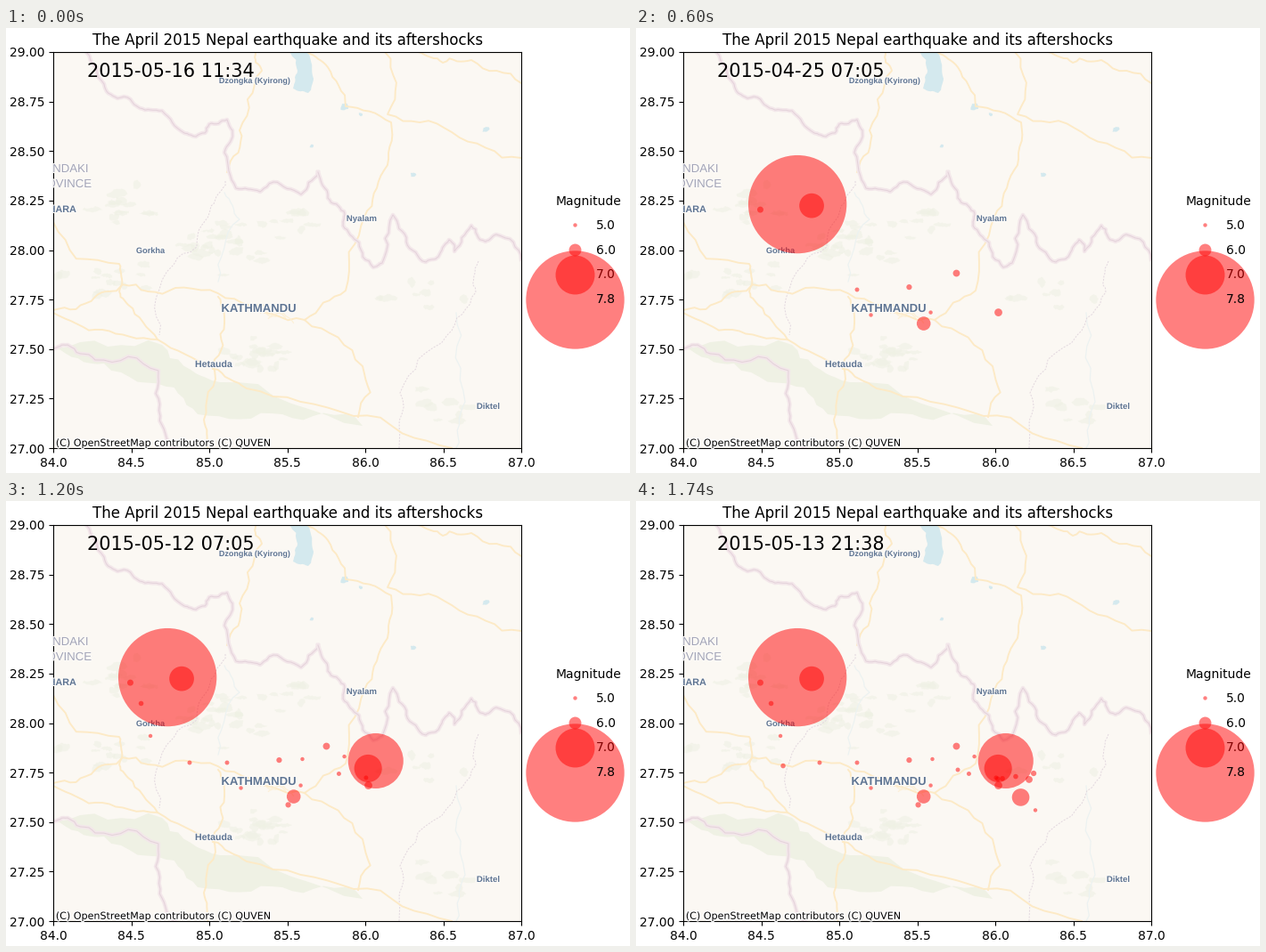
Recreate the animation shown at these times as a matplotlib script. Size 700 by 500 pixels, loop 1.8 s.

```python
import matplotlib.pyplot as plt
import numpy as np
from matplotlib import patheffects
from matplotlib.animation import FuncAnimation
from matplotlib.patches import Polygon
from matplotlib.transforms import Affine2D

W, H, DPI = 700, 500, 100
rng = np.random.default_rng(7)

# longitude, latitude, magnitude, in order of time
QUAKES = np.array([
    (84.731, 28.231, 7.8), (85.54, 27.629, 6.1), (86.019, 27.685, 5.6),
    (85.447, 27.813, 5.3), (85.113, 27.8, 5.1), (84.493, 28.204, 5.4),
    (85.585, 27.685, 5), (84.822, 28.224, 6.6), (85.75, 27.883, 5.5),
    (85.202, 27.672, 5), (85.596, 27.818, 5), (85.83, 27.744, 5.1),
    (86.004, 27.724, 5.1), (85.505, 27.587, 5.3), (84.562, 28.099, 5.2),
    (84.622, 27.935, 5), (84.873, 27.8, 5.1), (86.017, 27.771, 6.7),
    (85.865, 27.831, 5), (86.066, 27.809, 7.3), (86.015, 27.718, 5.2),
    (86.216, 27.715, 5.5), (86.162, 27.625, 6.3), (86.256, 27.56, 5),
    (86.245, 27.746, 5.3), (86.13, 27.73, 5.2), (85.759, 27.764, 5.1),
    (84.639, 27.784, 5.2), (86.045, 27.72, 5.2),
])
DAYS = {
    "04-25": "06:11 06:15 06:18 06:20 06:22 06:23 06:25 06:45 06:56 "
             "07:05 07:15 07:37 07:47 08:55 12:44 17:42 23:16",
    "04-26": "07:09 16:26",
    "05-12": "07:05 07:17 07:34 07:36 07:48 08:06 08:13 08:21 21:10",
    "05-13": "21:38",
}
# the clock opens on the last entry, before any quake is drawn
CLOCK = ["2015-05-16 11:34"] + [f"2015-{day} {t}" for day, times in DAYS.items()
                                for t in times.split()]
FRAMES = len(CLOCK)

fig = plt.figure(figsize=(W / DPI, H / DPI), dpi=DPI)
ax = fig.add_axes([53.2 / W, 28 / H, 525 / W, 445 / H], facecolor="#fbf8f3")
ax.set(xlim=(84, 87), ylim=(27, 29))
ax.set_title("The April 2015 Nepal earthquake and its aftershocks")
# stage pixels, y downwards
px = Affine2D().scale(1 / DPI, -1 / DPI).translate(0, H / DPI) + fig.dpi_scale_trans


def rough(pts, amount, levels=3):
    """Midpoint displacement, for a natural course."""
    pts = np.array(pts, float)
    for _ in range(levels):
        step = np.diff(pts, axis=0)
        normal = step[:, ::-1] * [-1, 1]
        mid = pts[:-1] + step / 2 + normal * rng.normal(0, amount, (len(step), 1))
        out = np.empty((2 * len(pts) - 1, 2))
        out[::2], out[1::2] = pts, mid
        pts = out
    return pts


def line(*pts, color="#fdeac6", width=1.9, core=None, amount=0.09, **kw):
    xy = rough(pts, amount)
    for c, w in ((color, width), (core, 1)):
        if c:
            ax.plot(*xy.T, color=c, lw=w * 0.72, transform=px, scalex=False,
                    scaley=False, solid_joinstyle="round", **kw)


def area(pts, color, amount=0.1, **kw):
    patch = Polygon(rough([*pts, pts[0]], amount), fc=color, lw=0, transform=px, **kw)
    ax.add_artist(patch)
    patch.set_clip_path(ax.patch)


def blob(x, y, rx, ry, color, **kw):
    a = np.linspace(0, 2 * np.pi, 9)[:-1]
    r = rng.uniform(0.6, 1.1, 8)
    area(np.column_stack([x + rx * r * np.cos(a), y + ry * r * np.sin(a)]), color, **kw)


def label(x, y, text, size, ha="center", color="#5f7593", weight="bold"):
    ax.text(x, y, text, fontsize=size * 0.72, ha=ha, va="baseline", color=color,
            weight=weight, family="Liberation Sans", transform=px, clip_on=True,
            path_effects=[patheffects.withStroke(linewidth=1.5, foreground="#fdfbf8")])


# woodland
GREEN = "#eff1e4"
area([(53, 360), (175, 356), (226, 400), (190, 404), (110, 377)], GREEN)
area([(172, 386), (240, 398), (400, 447), (310, 434), (215, 434)], GREEN)
for cx, cy, n in [(130, 200, 14), (110, 290, 14), (240, 245, 24), (330, 225, 10),
                  (290, 370, 20), (470, 300, 8), (500, 440, 8)]:
    for x, y in rng.normal((cx, cy), (26, 12), (n, 2)):
        blob(x, y, rng.uniform(4, 13), rng.uniform(2, 6), GREEN, alpha=0.6)

# water
WATER = "#d4e9ee"
area([(317, 27), (339, 27), (345, 57), (339, 73), (322, 68), (327, 48)], WATER, 0.06)
for x, y, r in [(380, 88, 6), (398, 97, 3), (457, 165, 4), (343, 133, 3), (538, 114, 5)]:
    blob(x, y, r, r * 0.8, WATER)
line((245, 185), (262, 215), (238, 285), color="#ecf2f1", width=1.2)
line((505, 320), (515, 420), (505, 472), color="#ecf2f1", width=1.2)

# province limits
limit = dict(color="#e3d8df", width=1, ls=(0, (2, 1.5)))
line((246, 172), (230, 200), (214, 246), (188, 266), (172, 345), **limit)
line((530, 262), (527, 297), (495, 345), (442, 410), (441, 472), **limit)

# roads
line((280, 27), (287, 48), (262, 115), (248, 162))
line((338, 27), (361, 44), (381, 88), (432, 106), (424, 160), (402, 212), (381, 295),
     (335, 328), amount=0.07)
line((425, 27), (428, 97), (500, 117), (578, 146))
line((462, 27), (490, 39), (522, 36), (578, 62))
line((335, 328), (265, 309), (190, 292), (130, 288), (127, 265), (53, 218))
line((130, 289), (100, 302), (53, 317))
line((129, 290), (137, 311), (170, 350))
line((238, 302), (245, 332), (232, 378), (222, 440), (226, 472))
line((232, 382), (170, 350), (108, 339), (53, 320), amount=0.06)
line((232, 383), (270, 405), (390, 436), (500, 472), amount=0.06)
line((335, 328), (400, 380), (395, 437))
for x, y in rng.normal((290, 322), (14, 4), (4, 2)):
    line((x - 14, y), (x, y - 8), (x + 14, y + 5), color="#fdf0d6", width=1.2)

# national borders
border = dict(color="#f3e7ea", width=4.5, core="#e4d2da")
line((90, 27), (110, 63), (125, 79), (150, 90), (175, 93), (200, 118), (213, 122),
     (228, 108), (248, 103), (254, 115), (245, 140), (258, 180), (285, 184),
     (300, 173), (331, 187), (350, 162), **border)
line((350, 162), (361, 191), (379, 206), (378, 222), (396, 241), (412, 269),
     (422, 264), (434, 210), (449, 240), (471, 263), (485, 257), (497, 238),
     (503, 251), (522, 222), (538, 240), (550, 232), (578, 260), **border)
line((53, 361), (69, 356), (100, 373), (171, 385), (173, 436), (190, 472), **border)

# place names
label(283.5, 319, "KATHMANDU", 13.1)
label(233, 381, "Hetauda", 10.6)
label(162, 253, "Gorkha", 9.2)
label(541, 428, "Diktel", 9.6)
label(399, 217, "Nyalam", 9.6)
label(279, 62, "Dzongka (Kyirong)", 9)
label(78.5, 207, "POKHARA", 10.8, "right")
label(93, 162, "GANDAKI", 13.2, "right", "#a3a5b8", "normal")
label(96.5, 179, "PROVINCE", 13.2, "right", "#a3a5b8", "normal")

ax.text(0.005, 0.005, "(C) OpenStreetMap contributors (C) QUVEN", size=8,
        transform=ax.transAxes, zorder=5,
        path_effects=[patheffects.withStroke(linewidth=2, foreground="w")])
clock = ax.text(0.25, 0.95, "", size=15, ha="center", va="center",
                transform=ax.transAxes, zorder=6)


def area_of(mag):
    return 10 ** (mag - 4)


# magnitude key
key = fig.add_axes([0, 0, 1, 1], xlim=(0, W), ylim=(H, 0))
key.axis("off")
key.text(653.5, 198.5, "Magnitude", ha="center", va="baseline")
for i, mag in enumerate([5.0, 6.0, 7.0, 7.8]):
    y = 221.3 + 27.75 * i
    key.scatter(637.5, y, s=area_of(mag), c="red", alpha=0.5, lw=0, zorder=3 + i)
    key.text(662, y + 4.5, f"{mag:.1f}", va="baseline", zorder=3.5 + i)

dots = ax.scatter([], [], c="red", alpha=0.5, lw=0, zorder=4)


def update(n):
    dots.set_offsets(QUAKES[:n, :2])
    dots.set_sizes(area_of(QUAKES[:n, 2]))
    clock.set_text(CLOCK[n])
    return dots, clock


anim = FuncAnimation(fig, update, frames=FRAMES, interval=1800 / FRAMES,
                     repeat=True, repeat_delay=0)
plt.show()
```
